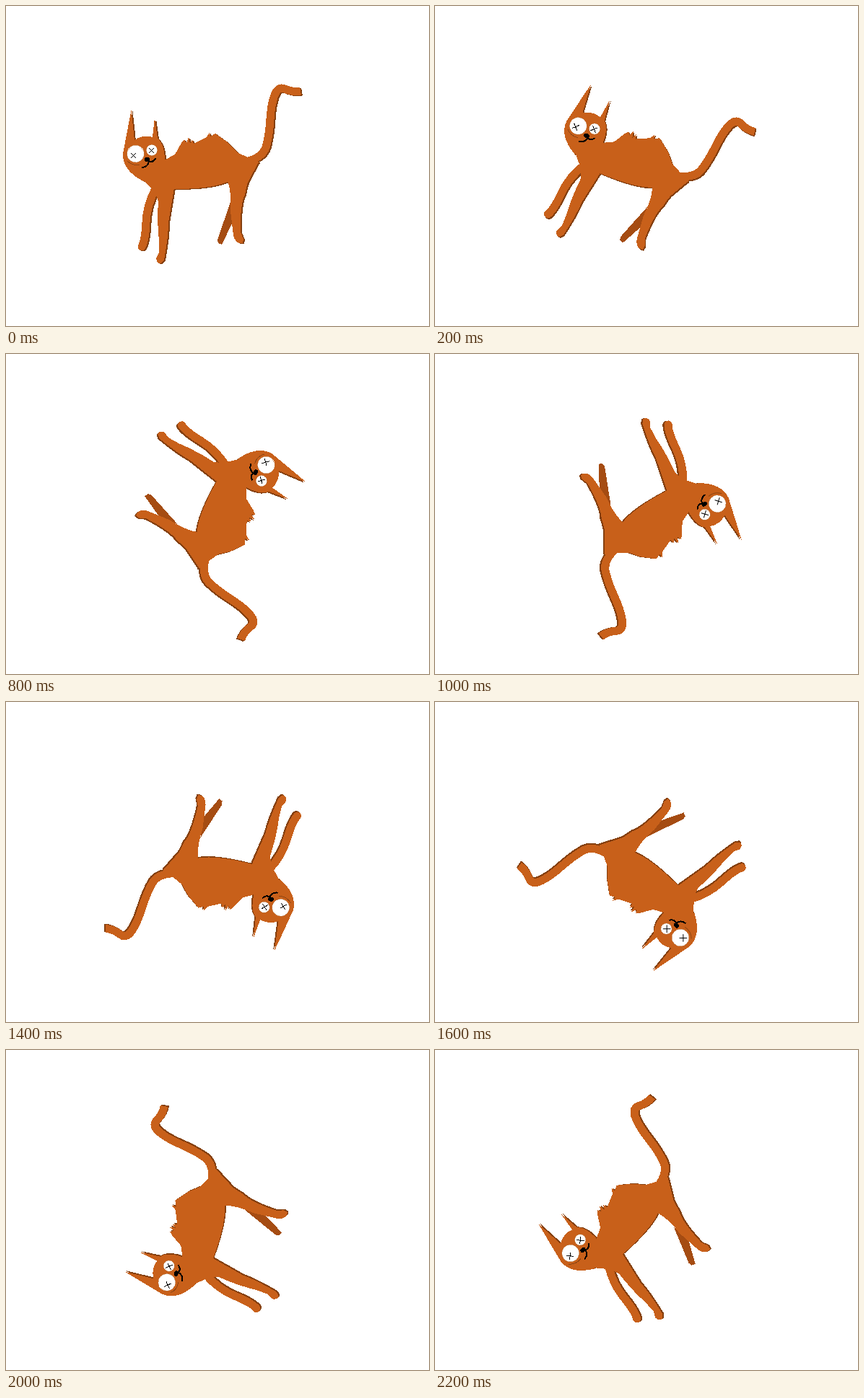
Write an HTML page that moves like this. It is 586 by 444 pixels and loops after 2400 ms.

```html
<!DOCTYPE html>
<html lang="en">
<head>
<meta charset="utf-8">
<title>Spinning cat</title>
<style>
  html, body { margin: 0; width: 100%; height: 100%; overflow: hidden; background: #fff; }
  svg { display: block; width: 586px; height: 444px; }
  .fur { color: #c8601a; }
  .shade { color: #85400f; }
  .far { fill: #a54c12; }
  .limb { fill: none; stroke: currentColor; stroke-width: 11; }
  .eye { fill: #fff; stroke: #b9743c; stroke-width: .6; }
  .line { fill: none; stroke: #000; stroke-linecap: round; }
</style>
</head>
<body>
<svg viewBox="0 0 586 444" shape-rendering="crispEdges">
  <defs>
    <g id="body" fill="currentColor">
      <path class="limb" d="M332 216Q358 210 361 192C368 165 364 150 370 130Q375 110 386 115T408 118"/>
      <path class="limb" stroke-linecap="round" d="M208 252Q195 275 194 300T188 334"/>
      <path d="M203 250L211 271Q209 300 212 325V342L208 350Q209 358 215 357L219 352Q225 320 225 300L233 252Z"/>
      <path d="M307 243Q313 260 311 285L315 318Q318 331 328 329L329 323 325 314Q324 275 331 262Q335 235 350 217L337 210Z"/>
      <path d="M219 214L234 206 243 190 247 185 250 190 253 182 255 191 258 185 260 191 278 182
        282 175 283 181 290 177 308 190 320 203 337 211 350 216 335 245 307 244Q285 254 233 254H202L189 240Z"/>
      <path d="M190 243Q161 228 162 205L169 168 173.5 145 178 186Q190 178 203 182L206 155 210 184Q220 192 220 215Z"/>
    </g>
  </defs>
  <g id="cat">
    <path class="far" d="M311 272L293 324 294 329 299 331 314 300Z"/>
    <use href="#body" class="shade" x="2" y="1"/>
    <use href="#body" class="fur"/>
    <path class="line" style="stroke:#8d4513" d="M168 215Q175 222 185 220"/>
    <circle class="eye" cx="179.5" cy="205" r="12"/>
    <circle class="eye" cx="202" cy="200" r="7.7"/>
    <path class="line" d="M173 204l7 7m0-7l-7 7M198 197l7 7m0-7l-7 7"/>
    <ellipse cx="195.5" cy="213" rx="4" ry="3"/>
    <path class="line" stroke-width="2" d="M189 224Q197 223 198 215 203 218 207 212"/>
  </g>
</svg>
<script>
  const STEP = 200;
  const PIVOT = "285 232.8";
  const angles = [0, 22.7, 43.5, 63.6, 119, 152, 167, 194, 225, 255.5, 290, 318.4];
  const cat = document.getElementById("cat");
  const start = performance.now();

  function draw(now) {
    const pose = Math.floor(Math.max(0, now - start) / STEP) % angles.length;
    cat.setAttribute("transform", `rotate(${angles[pose]} ${PIVOT})`);
    requestAnimationFrame(draw);
  }
  draw(start);
</script>
</body>
</html>
```
